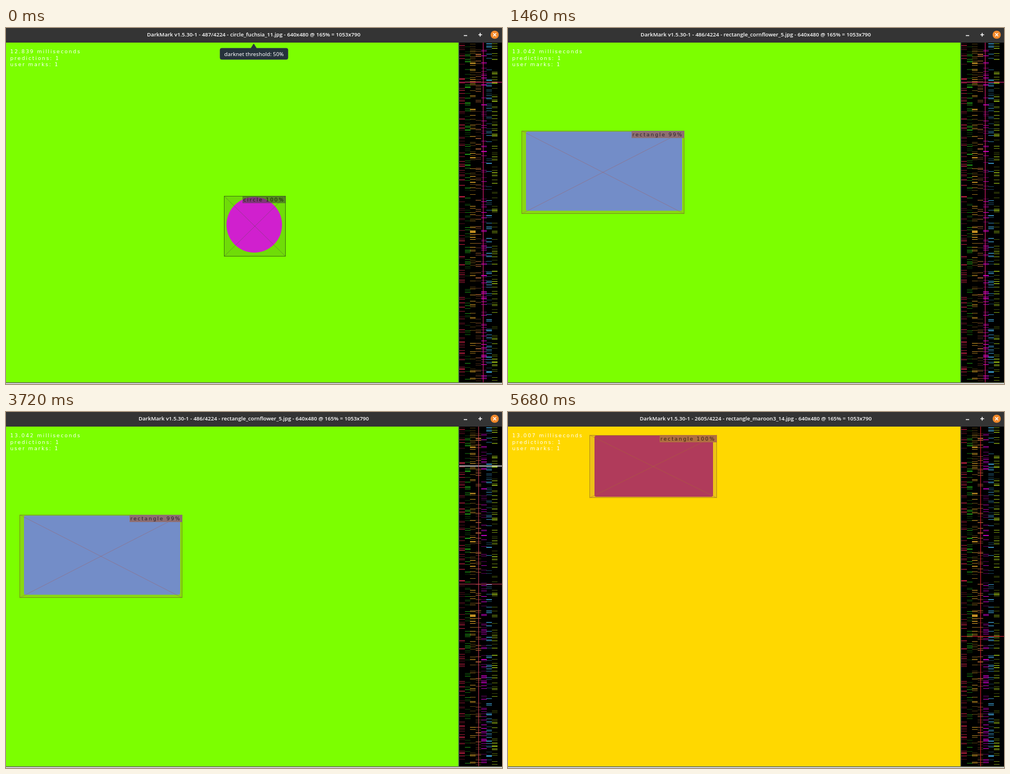
Animation of 883 by 634 pixels, one loop 8 s. Source, as an HTML page with a canvas:

```html
<!DOCTYPE html>
<html lang="en">
<head>
<meta charset="utf-8">
<style>
  html, body { margin: 0; width: 100%; height: 100%; overflow: hidden; background: #333; }
  canvas { display: block; }
</style>
</head>
<body>
<canvas id="stage" width="883" height="634"></canvas>
<script>
const ctx = document.getElementById('stage').getContext('2d');
const LOOP = 8000, TOP = 26, BOTTOM = 631, HEIGHT = BOTTOM - TOP, SIDE = 807;
const LIME = '#7cff00';

const scenes = [
  { at: 0, index: 487, file: 'circle_fuchsia_11', ms: '12.839', bg: LIME,
    box: [388, 299, 110, 108], fill: '#6fdc08', edge: '#3f7d0c', cross: 'rgba(80,80,70,.4)',
    shape: [392.5, 301, 99, 99], radius: 49.5, color: '#d020ce',
    label: 'circle 100%', labelX: 421, labelBg: 'rgba(64,72,56,.55)', ink: '#182808' },
  { at: 500, index: 486, file: 'rectangle_cornflower_5', ms: '13.042', bg: LIME,
    box: [24, 183, 290, 148], fill: '#89d90f', edge: '#78961a', cross: 'rgba(160,96,96,.45)',
    shape: [32, 184.5, 278, 141], radius: 3, color: '#738dc8',
    label: 'rectangle 99%', labelX: 220, labelBg: '#8e6e72', ink: '#25202a' },
  { at: 5680, index: 2605, file: 'rectangle_maroon3_14', ms: '13.007', bg: '#ffd800',
    box: [145, 41, 227, 112], fill: '#ecc316', edge: '#b58e18', cross: 'rgba(170,105,50,.5)',
    shape: [154, 42, 211, 109], radius: 3, color: '#b03b5b',
    label: 'rectangle 100%', labelX: 270, labelBg: '#b06e42', ink: '#35200f' },
];

const columnColors = ['#ea2650', '#22a316', '#f2b32c', '#b86b35', '#f000ee', '#45b4ee', '#b9e41c'];

// The pointer glides, but the screen only refreshes at these times
const refreshes = [2880, 3160, 3320, 3560, 3720, 3860, 4000, 4140, 4300, 4440, 4580, 4960];

function pointerAt(t) {
  const shown = refreshes.findLast(at => at <= t);
  if (!shown) return { x: 849, y: 96, color: '#e81c74' };
  const u = (shown - 2880) / 2080, left = 1 - u;
  return {
    x: Math.round(841 + 2.35 * left ** 3),
    y: Math.round(399 - 281 * left ** 2.13),
    color: `hsl(${345 + 10 * u} ${40 + 36 * u}% 50%)`,
  };
}

const bubbleAlpha = t => t < 1040 ? 1 : t < 1200 ? .66 : t < 1460 ? .33 : 0;

function fill(color, x, y, w, h) {
  ctx.fillStyle = color;
  ctx.fillRect(x, y, w, h);
}

function round(color, x, y, w, h, r) {
  ctx.fillStyle = color;
  ctx.beginPath();
  ctx.roundRect(x, y, w, h, r);
  ctx.fill();
}

function line(color, width, ...points) {
  ctx.strokeStyle = color;
  ctx.lineWidth = width;
  ctx.beginPath();
  for (let i = 0; i < points.length; i += 4) {
    ctx.moveTo(points[i], points[i + 1]);
    ctx.lineTo(points[i + 2], points[i + 3]);
  }
  ctx.stroke();
}

function text(str, x, y, font, color, align = 'left', spacing = 0) {
  ctx.font = font;
  ctx.fillStyle = color;
  ctx.textAlign = align;
  ctx.letterSpacing = spacing + 'px';
  ctx.fillText(str, x, y);
}

const plotText = (str, x, y, color) =>
  text(str, x, y, '9px "DejaVu Sans", sans-serif', color, 'left', 1.9);

function titleBar(s) {
  fill('#343434', 0, 0, 883, TOP);
  text(`DarkMark v1.5.30-1 - ${s.index}/4224 - ${s.file}.jpg - 640x480 @ 165% = 1053x790`,
    441, 15, '600 9.6px "Open Sans", sans-serif', '#fff', 'center');
  line('#f6f6f6', 1.6, 815, 13.5, 821, 13.5, 841, 12, 847.5, 12, 844.2, 8.8, 844.2, 15.2);
  round('#f2892a', 862.7, 4.7, 14.6, 14.6, 7.3);
  line('#fff', 1.5, 867.3, 9.3, 872.7, 14.7, 872.7, 9.3, 867.3, 14.7);
}

function picture(s) {
  fill(s.bg, 0, TOP, 806, HEIGHT);
  const [x, y, w, h] = s.box;
  fill(s.fill, x, y, w, h);
  round(s.color, ...s.shape, s.radius);
  line(s.cross, 1, x, y, x + w, y + h, x + w, y, x, y + h);
  ctx.strokeStyle = s.edge;
  ctx.strokeRect(x + .5, y + .5, w - 1, h - 1);
  fill(s.labelBg, s.labelX, y, x + w - s.labelX, 13);
  plotText(s.label, s.labelX + 1.5, y + 9.5, s.ink);
  [`${s.ms} milliseconds`, 'predictions: 1', 'user marks: 1']
    .forEach((str, i) => plotText(str, 7.5, 45 + i * 11.5, '#fff'));
}

function sideMap(s, p) {
  fill('#000', SIDE, TOP, 76, HEIGHT);
  fill('#34404c', 805.5, TOP, 1.5, HEIGHT);
  let seed = 29;
  const random = () => (seed = seed * 16807 % 2147483647) / 2147483647;
  columnColors.forEach((color, i) => {
    const x = Math.round(SIDE + i * 9.65);
    for (let k = 0; k < 125; k++) {
      ctx.globalAlpha = .3 + .65 * random() ** 2;
      fill(color, x, TOP + 1 + Math.floor(random() * (HEIGHT - 3)), 10, 1);
    }
  });
  ctx.globalAlpha = 1;
  const here = Math.round(TOP + HEIGHT * s.index / 4224);
  fill('#e8e8e8', SIDE, here, 76, 1);
  if (here !== p.y) fill('#777', SIDE, here - 1, 76, 1);
  fill(p.color, p.x, TOP, 1, HEIGHT);
  fill(p.color, SIDE, p.y, 76, 1);
}

function bubble(alpha) {
  ctx.globalAlpha = alpha;
  ctx.fillStyle = '#26323c';
  ctx.strokeStyle = 'rgba(70,84,88,.8)';
  ctx.lineWidth = 1;
  ctx.beginPath();
  ctx.roundRect(381, 36, 121, 20, 3);
  ctx.moveTo(436, 36);
  ctx.lineTo(441, 28);
  ctx.lineTo(446, 36);
  ctx.stroke();
  ctx.fill();
  text('darknet threshold: 50%', 441.5, 50, '9.7px "Noto Sans", sans-serif', '#fff', 'center');
  ctx.globalAlpha = 1;
}

function bottomEdge() {
  fill('#55603f', 0, BOTTOM, 883, 1);
  fill('#b9b9b9', 0, BOTTOM + 1, 883, 1);
  fill('#dedede', 0, BOTTOM + 2, 883, 1);
}

function draw(now) {
  const t = now % LOOP;
  const scene = scenes.findLast(s => s.at <= t);
  titleBar(scene);
  picture(scene);
  sideMap(scene, pointerAt(t));
  bubble(bubbleAlpha(t));
  bottomEdge();
  requestAnimationFrame(draw);
}
requestAnimationFrame(draw);
</script>
</body>
</html>
```
